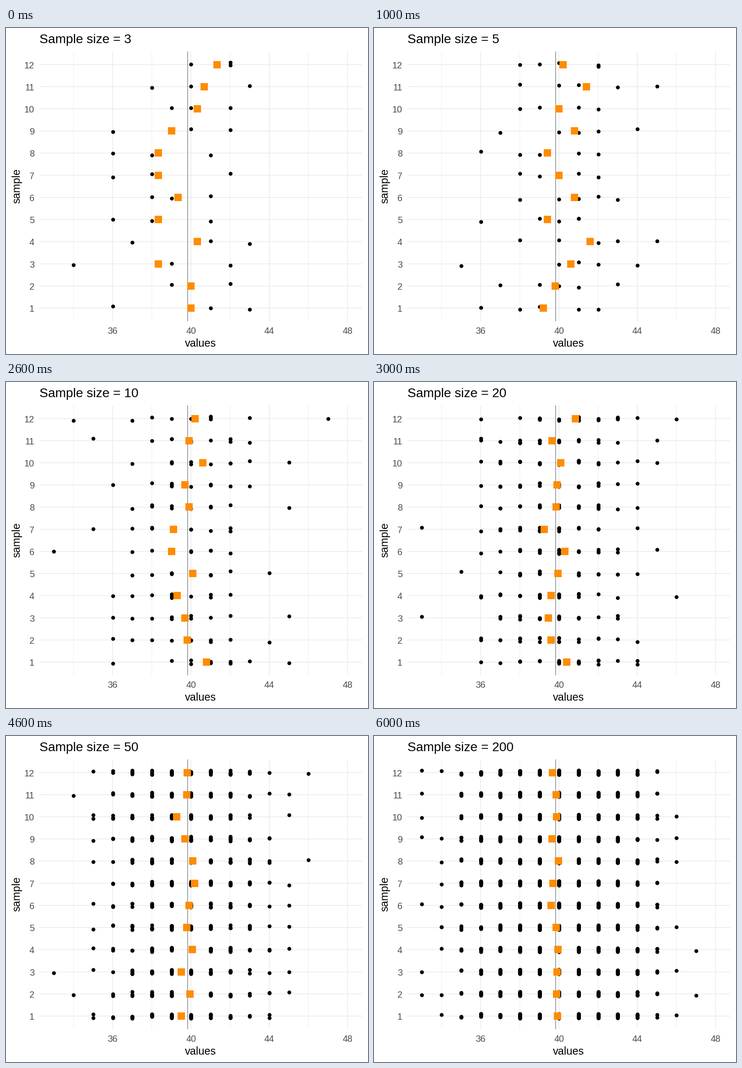
Recreate the animation shown at these times as a matplotlib script. Size 789x710 px, loop 7 s.

```python
import matplotlib.pyplot as plt
import numpy as np
from matplotlib.animation import FuncAnimation

W, H, DPI = 789, 710, 100
PX = 72 / DPI  # points per pixel
LEFT, RIGHT, TOP, BOTTOM = 72.5, 776.5, 51, 638.7
POPULATION_MEAN, SPREAD = 39.828, 2.15
JITTER = 0.1
GRID, TICK, ORANGE = "#ebebeb", "#4d4d4d", "#ff8c00"

# Sample means by sample size, from sample 1 up to sample 12.
MEANS = {
    3: [40, 40, 38.33, 40.33, 38.33, 39.33, 38.33, 38.33, 39, 40.33, 40.67, 41.33],
    5: [39.2, 39.8, 40.6, 41.6, 39.4, 40.8, 40, 39.4, 40.8, 40, 41.4, 40.2],
    10: [40.8, 39.8, 39.7, 39.3, 40.1, 39, 39.1, 39.9, 39.7, 40.6, 39.9, 40.2],
    20: [40.4, 39.6, 39.45, 39.6, 39.95, 40.3, 39.25, 39.85, 39.9, 40.1, 39.65, 40.85],
    50: [39.5, 39.94, 39.5, 40.06, 39.78, 39.9, 40.18, 40.1, 39.7, 39.26, 39.78, 39.8],
    100: [39.5, 39.97, 39.55, 39.85, 40.07, 39.83, 39.7, 40.2, 39.88, 39.94, 40.03, 40.08],
    200: [39.93, 39.87, 39.9, 39.95, 39.85, 39.59, 39.7, 39.97, 39.64, 39.88, 39.86, 39.67],
}
SIZES = list(MEANS)
SAMPLES = np.arange(1, 13)

plt.rcParams["font.family"] = "Liberation Sans"
rng = np.random.default_rng(12)
normal = np.sort(rng.normal(size=20000))


def x_px(value):
    return 104.5 + 42.667 * (value - 33)


def y_px(sample):
    return 610 - 48.22 * (sample - 1)


def draw_sample(n, mean):
    """Whole-number values, one from each n-th part of a bell curve."""
    z = np.quantile(normal, (np.arange(n) + rng.random(n)) / n)
    values = np.round(mean + SPREAD * (z - z.mean()))
    return np.clip(values, 33, 48)


def scatter(n):
    values = np.concatenate([draw_sample(n, mean) for mean in MEANS[n]])
    rows = np.repeat(SAMPLES, n) + rng.uniform(-JITTER, JITTER, values.size)
    return x_px(values), y_px(rows)


clouds = [scatter(n) for n in SIZES]

fig = plt.figure(figsize=(W / DPI, H / DPI), dpi=DPI, facecolor="white")
ax = fig.add_axes([0, 0, 1, 1])
ax.set_xlim(0, W)
ax.set_ylim(H, 0)
ax.axis("off")


def line(xs, ys, width=1.6, color=GRID, z=1):
    ax.plot(xs, ys, color=color, lw=width * PX, zorder=z, snap=False,
            solid_capstyle="butt")


def text(x, y, label, size, **style):
    return ax.text(x, y, label, fontsize=size * PX, va="baseline", **style)


def markers(shape, size, color, z):
    return ax.plot([], [], shape, color=color, ms=size * PX, mew=0, zorder=z)[0]


for value in range(34, 49, 2):
    x = x_px(value)
    major = value % 4 == 0
    line([x, x], [TOP, BOTTOM], 1.6 if major else 0.9)
    if major:
        text(x, 665.5, str(value), 19.6, ha="center", color=TICK)
for sample in SAMPLES:
    y = y_px(sample)
    line([LEFT, RIGHT], [y, y])
    text(62, y + 8, str(sample), 19.6, ha="right", color=TICK)

center = x_px(POPULATION_MEAN)
line([center, center], [TOP, BOTTOM], color="#8a9292", z=3)

title = text(73, 33, "", 28, ha="left")
text(424.3, 694, "values", 23.5, ha="center")
text(30.5, 344, "sample", 23.5, ha="center", rotation=90,
     rotation_mode="anchor")

dots = markers("o", 8.4, "black", 2)
squares = markers("s", 15.6, ORANGE, 4)


def draw(i):
    n = SIZES[i]
    dots.set_data(*clouds[i])
    squares.set_data(x_px(np.array(MEANS[n])), y_px(SAMPLES))
    title.set_text(f"Sample size = {n}")
    return dots, squares, title


anim = FuncAnimation(fig, draw, frames=len(SIZES), init_func=lambda: draw(0),
                     interval=1000, repeat=True, repeat_delay=0)
plt.show()
```
